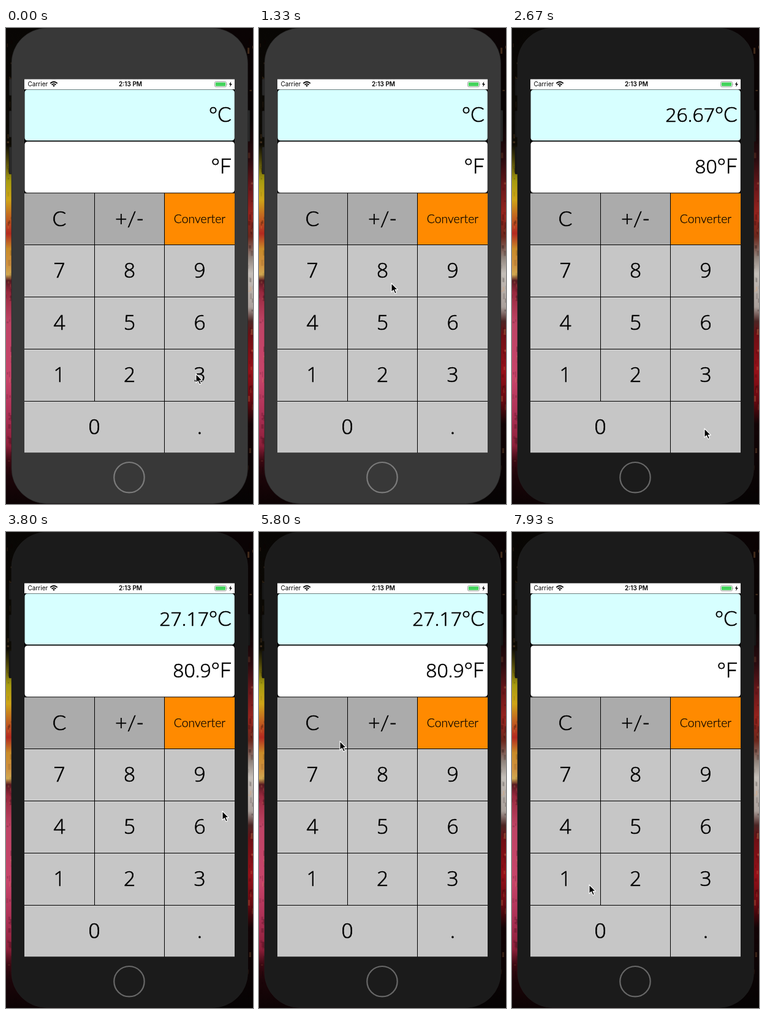
Animation of 403 by 776 pixels, one loop 8000 ms. Source, as an HTML page:

```html
<!DOCTYPE html>
<html lang="en">
<head>
<meta charset="utf-8">
<title>Temperature converter</title>
<style>
  html, body { margin: 0; width: 100%; height: 100%; overflow: hidden; background: #000; }
  svg { display: block; width: 403px; height: 776px; }
  .digits { font: 300 32px "Open Sans", sans-serif; }
  .key .digits { font-size: 33.5px; }
  .letters { font: 300 34px Lato, sans-serif; }
  .word { font: 300 19.4px Lato, sans-serif; }
  .digits, .letters { stroke: #000; stroke-width: .65px; }
  .word { stroke: #000; stroke-width: .25px; }
  .status { font: 400 10px Inter, sans-serif; }
  .clock { font: 600 10px Inter, sans-serif; }
  .key text { text-anchor: middle; }
</style>
</head>
<body>
<svg id="stage" viewBox="0 0 403 776">
  <defs>
    <linearGradient id="leftPaint" x2="0" y2="1"></linearGradient>
    <linearGradient id="rightPaint" x2="0" y2="1"></linearGradient>
  </defs>
  <rect width="202" height="776" fill="url(#leftPaint)"/>
  <rect x="202" width="201" height="776" fill="url(#rightPaint)"/>
  <g id="specks"></g>

  <g id="sideButtons" stroke="#111" stroke-width=".6">
    <rect x="5" y="83" width="6" height="27" rx="1"/>
    <rect x="5" y="135" width="6" height="43" rx="1"/>
    <rect x="5" y="194" width="6" height="44" rx="1"/>
    <rect x="392" y="134" width="6" height="51" rx="1"/>
  </g>
  <rect id="body" x="9" y=".3" width="385.5" height="775" rx="57" stroke="#222" stroke-width=".6"/>
  <circle id="home" cx="201" cy="732.7" r="24.7" fill="none" stroke-width="2.2"/>

  <rect x="30" y="83.5" width="343" height="609"/>
  <rect x="30" y="83.5" width="343" height="16.5" fill="#fff"/>
  <text class="status" x="35.5" y="95.3">Carrier</text>
  <g fill="none" stroke="#000" stroke-width="1.8">
    <path d="M72.3 90.2Q78 85.2 83.7 90.2M74.5 92.7Q78 89.6 81.5 92.7"/>
    <path d="M76.2 93.8Q78 92.3 79.8 93.8L78 96Z" fill="#000" stroke="none"/>
  </g>
  <text class="clock" x="203" y="95.3" text-anchor="middle">2:13 PM</text>
  <rect x="340.5" y="87.5" width="19" height="8.5" rx="2" fill="#fff" stroke="#888" stroke-width=".8"/>
  <rect x="341.8" y="88.8" width="16.4" height="5.9" rx="1" fill="#42d35b"/>
  <path d="M360.6 90.2q1.5 1.5 0 3z" fill="#888"/>
  <path d="M367.3 87.3L363.8 92.3H366L365.2 96.3L368.8 91H366.6Z"/>

  <rect x="30.5" y="100.5" width="342.3" height="83" rx="4.5" fill="#d7ffff"/>
  <rect x="30.5" y="185.3" width="342.3" height="83.2" rx="4.5" fill="#fff"/>
  <text x="368" y="153" text-anchor="end"><tspan class="digits" id="celsius"></tspan><tspan class="letters">°C</tspan></text>
  <text x="368" y="237" text-anchor="end"><tspan class="digits" id="fahrenheit"></tspan><tspan class="letters">°F</tspan></text>
  <g id="keys"></g>

  <path id="cursor" d="M0 0V14.6L3.4 11.5L5.9 17L8.4 15.9L6 10.6H10.4Z" stroke="#fff" stroke-width="1.1" stroke-linejoin="round"/>
</svg>
<script>
const LOOP = 8000;
const $ = id => document.getElementById(id);

function add(parent, tag, attrs, text = '') {
  const node = document.createElementNS('http://www.w3.org/2000/svg', tag);
  for (const name in attrs) node.setAttribute(name, attrs[name]);
  node.textContent = text;
  parent.appendChild(node);
  return node;
}

// Desktop wallpaper: "y colour" stops down each side.
function paint(id, stops) {
  for (const stop of stops.split(',')) {
    const [y, color] = stop.trim().split(' ');
    add($(id), 'stop', { offset: y / 776, 'stop-color': color });
  }
}
paint('leftPaint', `0 #080604, 190 #0d0b05, 215 #4b4408, 250 #a89c10, 280 #cfa518,
  305 #c36a20, 335 #b42a20, 360 #c98c28, 385 #d0903f, 402 #d0a850, 412 #571820,
  430 #97283d, 480 #bf4466, 570 #c8446a, 630 #ac3055, 680 #8d1f3a, 705 #3a0811, 730 #1c0509, 776 #0c0304`);
paint('rightPaint', `0 #0a0304, 150 #090404, 215 #2b0b0f,
  260 #6b171a, 305 #98241d, 340 #6b271c, 375 #92867e, 400 #c4beb8, 455 #aaa09b,
  478 #4c2524, 500 #6f0f14, 560 #951018, 610 #62080f, 645 #130406, 776 #050303`);

let seed = 7;
const random = () => (seed = seed * 16807 % 2147483647) / 2147483647;
for (let i = 0; i < 150; i++) {
  add($('specks'), 'rect', {
    x: (i % 2 ? 394 : 0) + random() * 8, y: random() * 776,
    width: 1 + random() * 3, height: 2 + random() * 8,
    fill: random() < .8 ? '#100' : '#e8a060', opacity: .08 + random() * .2
  });
}

const columns = [30, 145, 259, 374];
const rows = [269.5, 354, 439, 524, 609, 693.3];
const labels = {};

function key(label, row, column, span = 1, fill = '#c6c6c6', style = 'digits') {
  const x = columns[column], y = rows[row];
  const width = columns[column + span] - x - 1, height = rows[row + 1] - y - 1;
  const group = add($('keys'), 'g', { class: 'key' });
  add(group, 'rect', { x, y, width, height, fill });
  labels[label] = add(group, 'text', {
    class: style, x: x + width / 2, y: y + (style === 'word' ? 48.5 : 53)
  }, label);
}
key('C', 0, 0, 1, '#ababab', 'letters');
key('+/-', 0, 1, 1, '#ababab', 'letters');
key('Converter', 0, 2, 1, '#ff8a00', 'word');
['789', '456', '123'].forEach((line, row) =>
  [...line].forEach((digit, column) => key(digit, row + 1, column)));
key('0', 4, 0, 2);
key('.', 4, 2);

const presses = [[1570, '8'], [2170, '0'], [2730, '.'], [3300, '9'], [6230, 'C']];
const path = [
  [0, 310, 564], [450, 310, 564], [1330, 216, 416], [1520, 208, 405], [1650, 208, 405],
  [2100, 180, 650], [2240, 180, 650], [2670, 314, 653], [2800, 314, 653],
  [3220, 324, 398], [3380, 324, 398], [3800, 353, 455], [4700, 353, 455],
  [5800, 132, 341], [6150, 100, 320], [6350, 100, 320],
  [7070, 272, 497], [7930, 126, 575], [LOOP, 126, 575]
];

function cursorAt(time) {
  const next = path.findIndex(point => point[0] > time);
  const [t0, x0, y0] = path[next - 1], [t1, x1, y1] = path[next];
  const u = (time - t0) / (t1 - t0), eased = u * u * (3 - 2 * u);
  return [x0 + (x1 - x0) * eased, y0 + (y1 - y0) * eased];
}

function draw() {
  const time = performance.now() % LOOP;
  let entry = '';
  for (const [at, label] of presses) {
    const elapsed = time - at;
    if (elapsed >= 0) entry = label === 'C' ? '' : entry + label;
    labels[label].setAttribute('opacity', elapsed > -90 && elapsed < 20 ? .25 : 1);
  }
  $('fahrenheit').textContent = entry;
  $('celsius').textContent = entry && ((parseFloat(entry) - 32) * 5 / 9).toFixed(2);

  // The window turns dark once the first tap gives it focus.
  const focused = time >= presses[0][0] - 90;
  const shade = focused ? '#1b1b1b' : '#383838';
  $('body').setAttribute('fill', shade);
  $('sideButtons').setAttribute('fill', focused ? '#171717' : '#292929');
  $('home').setAttribute('stroke', focused ? '#686868' : '#7b7b7b');

  $('cursor').setAttribute('transform', `translate(${cursorAt(time)})`);
  requestAnimationFrame(draw);
}
draw();
</script>
</body>
</html>
```
